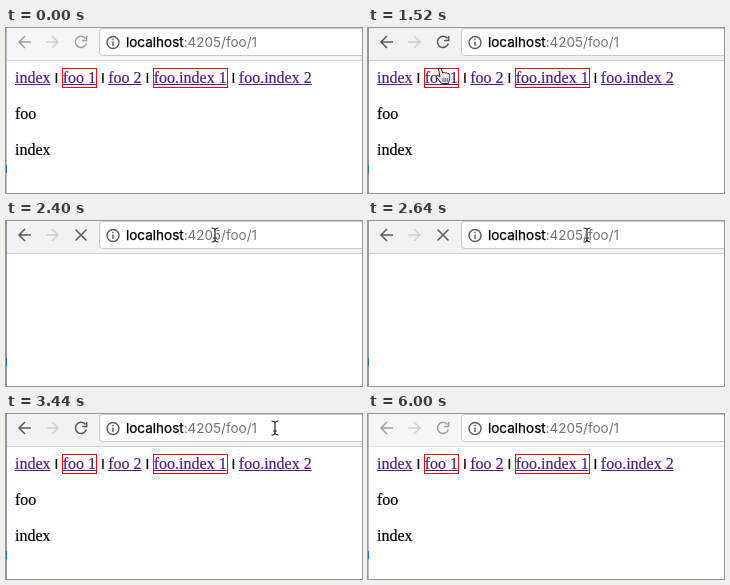
Recreate the animation shown at these times as an HTML page. Size 356 px wide and 165 px high, loop 6080 ms.

```html
<!DOCTYPE html>
<html lang="en">
<head>
<meta charset="utf-8">
<title>Reloading a routed page</title>
<style>
  html, body { margin: 0; width: 100%; height: 100%; overflow: hidden; background: #fff; }
  svg { position: absolute; left: 0; top: 0; }
  main { position: absolute; left: 9px; top: 41px; white-space: nowrap; color: #000;
         font: 16px/18px "Liberation Serif", serif; -webkit-text-stroke: .2px; }
  p { margin: 18px 0 0; }
  a { color: #551a8b; text-decoration: underline; }
  i { display: inline-block; width: .32em; text-align: right; vertical-align: 2px;
      font: bold 10px/0 "Liberation Sans", sans-serif; }
  .active { border: 1px solid #f00; padding-bottom: 1px; }
  .toolbar { fill: #f2f2f2; }
  .idle .toolbar { fill: #f6f6f6; }
  .rule { fill: #ccc; }
  .idle .rule { fill: #ddd; }
  .bar { fill: none; stroke: #5a5a5a; stroke-width: 1.5; }
  .idle .bar { stroke: #a0a0a0; }
  .forward { fill: none; stroke: #d0d0d0; stroke-width: 1.5; }
  .edge { fill: #999; }
  .idle .edge { fill: #bbb; }
  .url { font: 13.5px Inter, sans-serif; fill: #737373; }
  .host { fill: #000; stroke: #000; stroke-width: .25; }
  .cursor { stroke-linejoin: round; }
</style>
</head>
<body>
<main>
  <nav><a>index</a> <i>|</i> <a>foo 1</a> <i>|</i> <a>foo 2</a> <i>|</i> <a>foo.index 1</a> <i>|</i> <a>foo.index 2</a></nav>
  <p id="first"></p>
  <p id="second"></p>
</main>
<svg id="chrome" width="356" height="165" viewBox="0 0 356 165">
  <path class="toolbar" d="M0 0h356v33H0z"/>
  <path class="rule" d="M0 32h356v1H0z"/>
  <rect x="93.5" y=".5" width="280" height="27" rx="3" fill="#fff" stroke="#c8c8c8"/>
  <path class="edge" d="M0 0h1v165H0z"/>
  <path fill="#1a6fb8" d="M0 137h1v8H0z"/>
  <path class="bar" d="M25 14H13m6-6l-6 6 6 6"/>
  <path class="forward" d="M40 14h12m-6-6l6 6-6 6"/>
  <g id="reload">
    <path class="bar" d="M79.5 10.5A5.6 5.6 0 1 0 80.4 15.5"/>
    <path class="bar" d="M80.7 8v4.6h-4.6"/>
  </g>
  <path id="stop" class="bar" d="M69.5 8.5l11 11m0-11l-11 11"/>
  <g fill="none" stroke="#5a5a5a" stroke-width="1.4">
    <circle cx="107" cy="14.5" r="6"/>
    <path d="M107 13.5v4.5m0-7.2v1.4"/>
  </g>
  <text class="url" x="120" y="19"><tspan class="host">localhost</tspan>:4205/foo/1</text>
  <g id="arrow" class="cursor">
    <path fill="#000" stroke="#fff" d="M0 0v14l3.2-3 2.2 5.2 2.4-1L5.6 10H10z"/>
  </g>
  <g id="hand" class="cursor">
    <path fill="#e4e4e4" stroke="#333" d="M-1.5 1.2Q0-1 1.5 1.2L2.6 5Q4.4 3.6 5.4 5 7 4 7.8 5.6 9.6 5 9.7 7.4V11L8.4 15.5H1.8L-3.4 9.4Q-4.4 7.2-2 7.4L0 9z"/>
    <path fill="none" stroke="#333" stroke-width=".8" d="M3 10v4m2.1-4v4m2.1-4v4"/>
  </g>
  <g id="beam" class="cursor" fill="none">
    <path stroke="#fff" stroke-width="2.6" d="M-3.5-7Q0-7 0-4.5 0-7 3.5-7M0-5V5M-3.5 7Q0 7 0 4.5 0 7 3.5 7M-2 3h4"/>
    <path stroke="#222" stroke-width="1.2" d="M-3.5-7Q0-7 0-4.5 0-7 3.5-7M0-5V5M-3.5 7Q0 7 0 4.5 0 7 3.5 7M-2 3h4"/>
  </g>
</svg>
<script>
const LOOP = 6080, STEP = 80;
const $ = id => document.getElementById(id);
const page = document.querySelector('main');
const links = [...document.querySelectorAll('a')];

// time, x, y, cursor shape from that time on
const path = [
  [1120, 277, 146, 'arrow'], [1280, 185, 96, 'arrow'], [1440, 92, 62, 'arrow'],
  [1520, 72, 40, 'hand'], [1680, 73, 38, 'hand'], [1760, 74, 22, 'arrow'],
  [1840, 75, 14, 'arrow'], [2000, 75, 14, 'arrow'], [2160, 115, 14, 'beam'],
  [2400, 209, 14, 'beam'], [2560, 209, 14, 'beam'], [3040, 269, 14, 'beam'],
  [5040, 269, 14, 'beam'], [5120, 277, 14, 'beam'], [5200, 327, 14, 'beam'],
  [5280, 340, -20, '']
];

function cursorAt(t) {
  const i = path.findLastIndex(k => k[0] <= t);
  if (i < 0 || i === path.length - 1) return [0, 0, ''];
  const [t0, x0, y0, shape] = path[i], [t1, x1, y1] = path[i + 1];
  const u = (t - t0) / (t1 - t0);
  return [x0 + (x1 - x0) * u, y0 + (y1 - y0) * u, shape];
}

const show = (el, on) => { el.style.visibility = on ? 'visible' : 'hidden'; };

function render(time) {
  const t = Math.floor(time % LOOP / STEP) * STEP;
  const blank = t >= 2080 && t < 2800;
  const loading = t >= 2800 && t < 3440;
  const stopping = t >= 2000 && t < 2800;

  $('chrome').classList.toggle('idle', t < 720 || t >= 6000);
  show(page, !blank);
  show($('reload'), !stopping);
  show($('stop'), stopping);
  links.forEach((a, i) => a.classList.toggle('active', loading ? i > 0 : i === 1 || i === 3));
  $('first').textContent = loading ? 'Loading application' : 'foo';
  $('second').textContent = loading ? '' : 'index';

  const [x, y, shape] = cursorAt(t);
  for (const id of ['arrow', 'hand', 'beam']) {
    show($(id), id === shape);
    $(id).setAttribute('transform', `translate(${x} ${y})`);
  }
}

function tick() {
  render(performance.now());
  requestAnimationFrame(tick);
}
tick();
</script>
</body>
</html>
```
